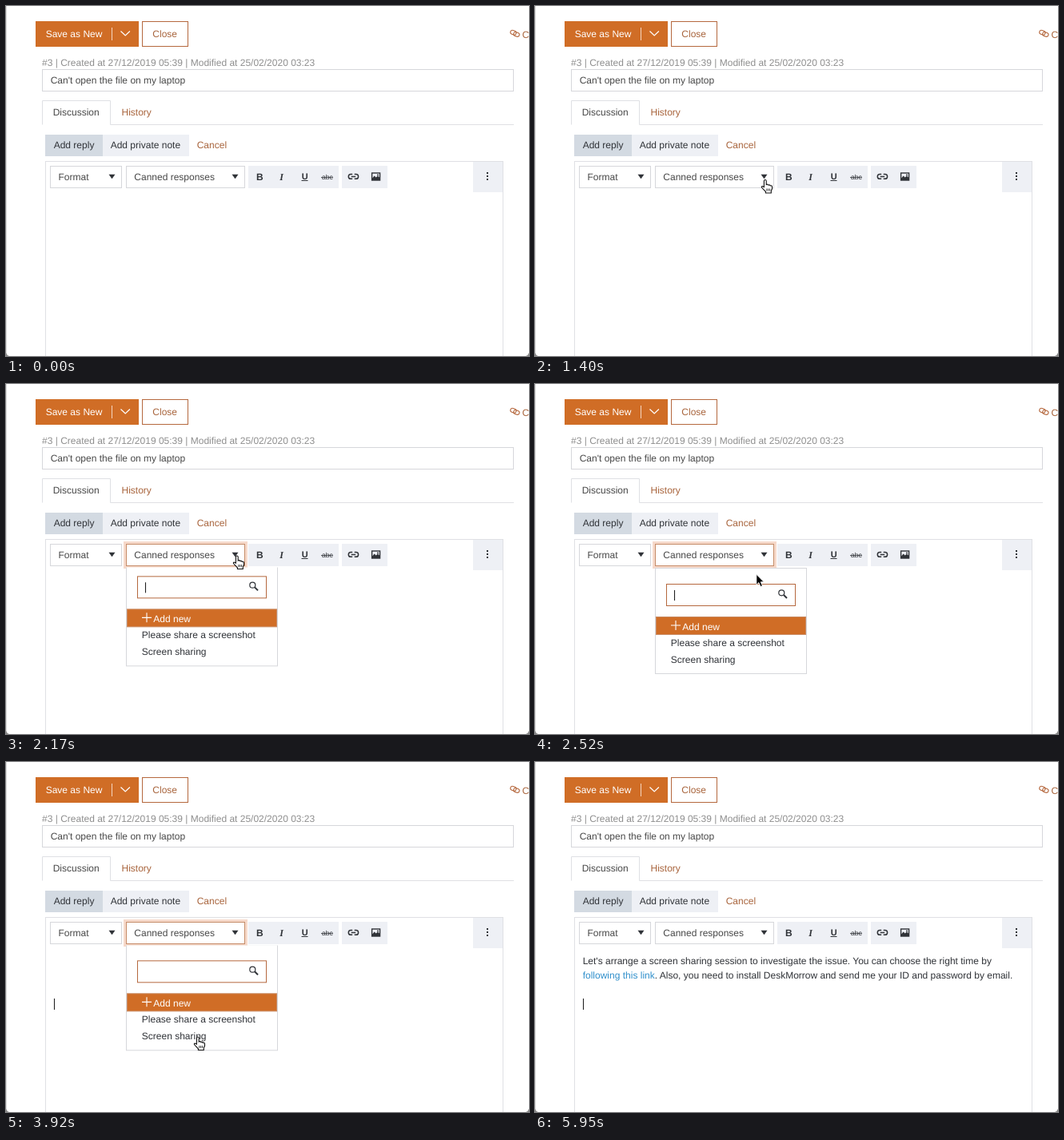
Animation, 654 px wide and 438 px high, one loop 6.02 s. Source, as an HTML page:

```html
<!DOCTYPE html>
<html lang="en">
<head>
<meta charset="utf-8">
<title>Canned responses</title>
<style>
  html, body { margin: 0; width: 100%; height: 100%; overflow: hidden; background: #fff; }
  svg { display: block; }
  text { font: 12px "Liberation Sans", Arial, sans-serif; fill: #484848; text-rendering: geometricPrecision; }
  .brown { fill: #a8643c; }
  .white { fill: #fff; }
  .dark { fill: #303338; }
  .orange { fill: #d06d26; }
  .pale { fill: #eef0f5; }
  .box { fill: #fff; stroke: #d6d7db; }
  .line { fill: none; stroke: #dfe0e4; }
  .edge { fill: #fff; stroke: #b5683e; }
  .icon { fill: none; stroke: #303338; stroke-width: 1.4; }
  .caret { stroke: #222; stroke-width: 1.1; }
</style>
</head>
<body>
<svg width="654" height="438" viewBox="0 0 654 438">
  <defs>
    <clipPath id="below"><rect x="140" y="229.5" width="210" height="140"/></clipPath>
    <path id="down" d="M0 0h8l-4 5.5z"/>
    <g id="chain" fill="none" stroke-width="1.5">
      <path d="M5.5 1H3.5a2.8 2.8 0 0 0 0 5.8h2M8 1h2a2.8 2.8 0 0 1 0 5.8h-2M4 3.9h5.5"/>
    </g>
  </defs>

  <path d="M.5 0V438" stroke="#dcdcdc"/>
  <path d="M0 434v4h4q-3-1-4-4M654 434v4h-4q3-1 4-4" fill="#888"/>

  <!-- Header -->
  <rect class="orange" x="37" y="19" width="129" height="32"/>
  <text class="white" x="49.7" y="39">Save as New</text>
  <path d="M132.5 27v16" stroke="#f3d5bf"/>
  <path d="M143.5 31.5l5.7 5.5 5.7-5.5" fill="none" stroke="#fff" stroke-width="1.2"/>
  <rect class="edge" x="170.5" y="19.5" width="57" height="31"/>
  <text class="brown" x="183.3" y="39">Close</text>
  <g fill="none" stroke="#b5683e" stroke-width="1.1">
    <rect x="630.8" y="30.6" width="7.4" height="5" rx="2.5" transform="rotate(20 634 33)"/>
    <rect x="634.8" y="32.8" width="7.4" height="5" rx="2.5" transform="rotate(20 638 35)"/>
  </g>
  <text class="brown" x="645.6" y="39.5">C</text>

  <text x="45" y="75" style="fill:#8e8e8e">#3 | Created at 27/12/2019 05:39 | Modified at 25/02/2020 03:23</text>
  <rect class="box" x="45.5" y="79.5" width="589" height="27"/>
  <text x="55.7" y="97">Can't open the file on my laptop</text>

  <!-- Tabs and reply buttons -->
  <path class="line" d="M45.5 148.5v-30h85v30H635"/>
  <text x="58.7" y="137">Discussion</text>
  <text class="brown" x="144.5" y="137">History</text>
  <rect x="49" y="161" width="72" height="27" fill="#d3dae2"/>
  <rect class="pale" x="121" y="161" width="108" height="27"/>
  <text class="dark" x="59.7" y="178">Add reply</text>
  <text class="dark" x="130.7" y="178">Add private note</text>
  <text class="brown" x="238.7" y="178">Cancel</text>

  <!-- Editor -->
  <rect class="line" x="49.5" y="194.5" width="572" height="250"/>
  <rect class="box" x="55.5" y="200.5" width="89" height="27"/>
  <text x="65.5" y="218">Format</text>
  <use href="#down" class="dark" x="128.5" y="210.8"/>
  <rect id="glow" x="149" y="199" width="151" height="30" fill="none" stroke="#f6d9ca" stroke-width="4"/>
  <rect id="select" class="box" x="150.5" y="200.5" width="148" height="27"/>
  <text x="160.3" y="218">Canned responses</text>
  <use href="#down" class="dark" x="282.5" y="210.8"/>

  <path class="pale" d="M303 200h113v28h-113zM420 200h57v28h-57zM584 195h37v38h-37z"/>
  <text class="dark" x="313" y="217.5" font-weight="bold" style="font-weight:bold">B</text>
  <text class="dark" x="342.3" y="217.5" style="font:italic bold 12px 'Liberation Serif',serif">I</text>
  <text class="dark" x="369.7" y="216.5" style="font-weight:bold;font-size:11px">U</text>
  <path d="M369.5 218.5h8" stroke="#303338"/>
  <text class="dark" x="395" y="217" style="font-size:8.5px">abc</text>
  <path d="M394 214.5h15" stroke="#303338" stroke-width=".8"/>
  <use href="#chain" x="427.7" y="209.5" stroke="#303338"/>
  <rect class="icon" x="457.6" y="209" width="10" height="9"/>
  <path class="dark" d="M458 218v-2.5l2.7-3 2 2 2.3-2 3 3v2.5z"/>
  <circle class="dark" cx="465" cy="211.5" r="1"/>
  <path class="dark" d="M601 208h2v2h-2zM601 212h2v2h-2zM601 216h2v2h-2z"/>

  <g id="reply">
    <text class="dark" x="59.7" y="253">Let's arrange a screen sharing session to investigate the issue. You can choose the right time by</text>
    <text class="dark" x="59.7" y="271"><tspan fill="#2f8fcb">following this link</tspan>. Also, you need to install DeskMorrow and send me your ID and password by email.</text>
  </g>
  <path id="emptyCaret" class="caret" d="M59.5 242v14"/>
  <path id="replyCaret" class="caret" d="M60.5 296v14"/>

  <!-- Drop-down list -->
  <g clip-path="url(#below)">
    <g id="popup">
      <rect class="box" x="150.5" y="230.5" width="189" height="132"/>
      <rect class="edge" x="164.5" y="250.5" width="161" height="27"/>
      <path id="searchCaret" class="caret" d="M174.5 258v13"/>
      <circle class="icon" cx="308.3" cy="261.3" r="3.5" style="stroke-width:1.2"/>
      <path class="icon" d="M311 264l4 4" style="stroke-width:2"/>
      <rect class="orange" x="151.5" y="291.5" width="187" height="22" stroke="#c98a62"/>
      <path d="M170 302h12M176 296v12" stroke="#fff" stroke-width="1.1"/>
      <text class="white" x="184.3" y="308">Add new</text>
      <text class="dark" x="169.8" y="328">Please share a screenshot</text>
      <text class="dark" x="169.8" y="349">Screen sharing</text>
    </g>
  </g>

  <g id="pointer">
    <path id="arrow" d="M0 0v13l3-2.8 2.2 5 2.3-1-2.2-4.8h4z" stroke="#fff" stroke-width=".8"/>
    <g id="hand" fill="#fff" stroke="#111" stroke-width="1.1">
      <path d="M-1.6 8V.4a1.4 1.4 0 0 1 2.8 0V5q1.6-1 2.6.6 1.6-.8 2.5.8 2.2-.6 2.2 1.4v2.5L7.3 12.700V15.500H.4V13.800L-4.4 8.800q-.8-2 1.2-1.600z"/>
      <path d="M1.800 10v3M3.700 10v3M5.600 10v3" stroke-width=".8"/>
    </g>
    <path id="beam" d="M-4-7.500h2.500L0-6l1.500-1.500H4M-4 8.500h2.500L0 7l1.500 1.500H4M0-6V7M-2 2.500h4" fill="none" stroke="#111" stroke-width="1.300"/>
  </g>
</svg>
<script>
const LOOP = 6020, OPEN = 2010, CLOSE = 3920, INSERT = 3990, POPUP_HEIGHT = 134;
const el = id => document.getElementById(id);
const show = (id, on) => { el(id).style.display = on ? "" : "none"; };
const clamp = v => Math.min(1, Math.max(0, v));
const easeOut = v => 1 - (1 - v) ** 2;
const within = (t, from, to) => t >= from && t < to;
const blink = (t, start) => (t - start) % 1000 < 500;

// Pointer stops: time, x, y
const stops = [
  [70, 262, 440], [840, 245, 328], [1500, 289, 216], [2240, 289, 216],
  [2520, 277, 238], [3220, 241, 346], [3360, 241, 346], [3560, 243, 358],
  [3780, 240, 345], [4550, 240, 345], [5150, 525, 448]
];

function pointerAt(t) {
  const next = stops.findIndex(s => s[0] > t);
  if (next < 1) return null;
  const [t0, x0, y0] = stops[next - 1], [t1, x1, y1] = stops[next];
  const p = easeOut((t - t0) / (t1 - t0));
  return [x0 + (x1 - x0) * p, y0 + (y1 - y0) * p];
}

function render(t) {
  const opened = easeOut(clamp((t - OPEN) / 220)) * (1 - easeOut(clamp((t - CLOSE) / 160)));
  show("popup", opened > 0);
  el("popup").setAttribute("transform", `translate(0 ${(opened - 1) * POPUP_HEIGHT})`);

  const focused = within(t, OPEN + 70, INSERT);
  show("glow", focused);
  el("select").style.stroke = focused ? "#c58a66" : "";

  show("reply", t >= INSERT);
  show("emptyCaret", within(t, 560, 1820) && blink(t, 560));
  show("searchCaret", blink(t, 2240));
  show("replyCaret", t >= 3900 && blink(t, 3900));

  const pos = pointerAt(t);
  show("pointer", pos);
  if (pos) {
    const [x, y] = pos;
    const beam = t >= 4060;
    const hand = !beam && (y < 228 || (t > OPEN && y > 291));
    el("pointer").setAttribute("transform", `translate(${x} ${y})`);
    show("beam", beam);
    show("hand", hand);
    show("arrow", !beam && !hand);
  }
}

const begin = performance.now();
function tick() {
  render((performance.now() - begin) % LOOP);
  requestAnimationFrame(tick);
}
tick();
</script>
</body>
</html>
```
